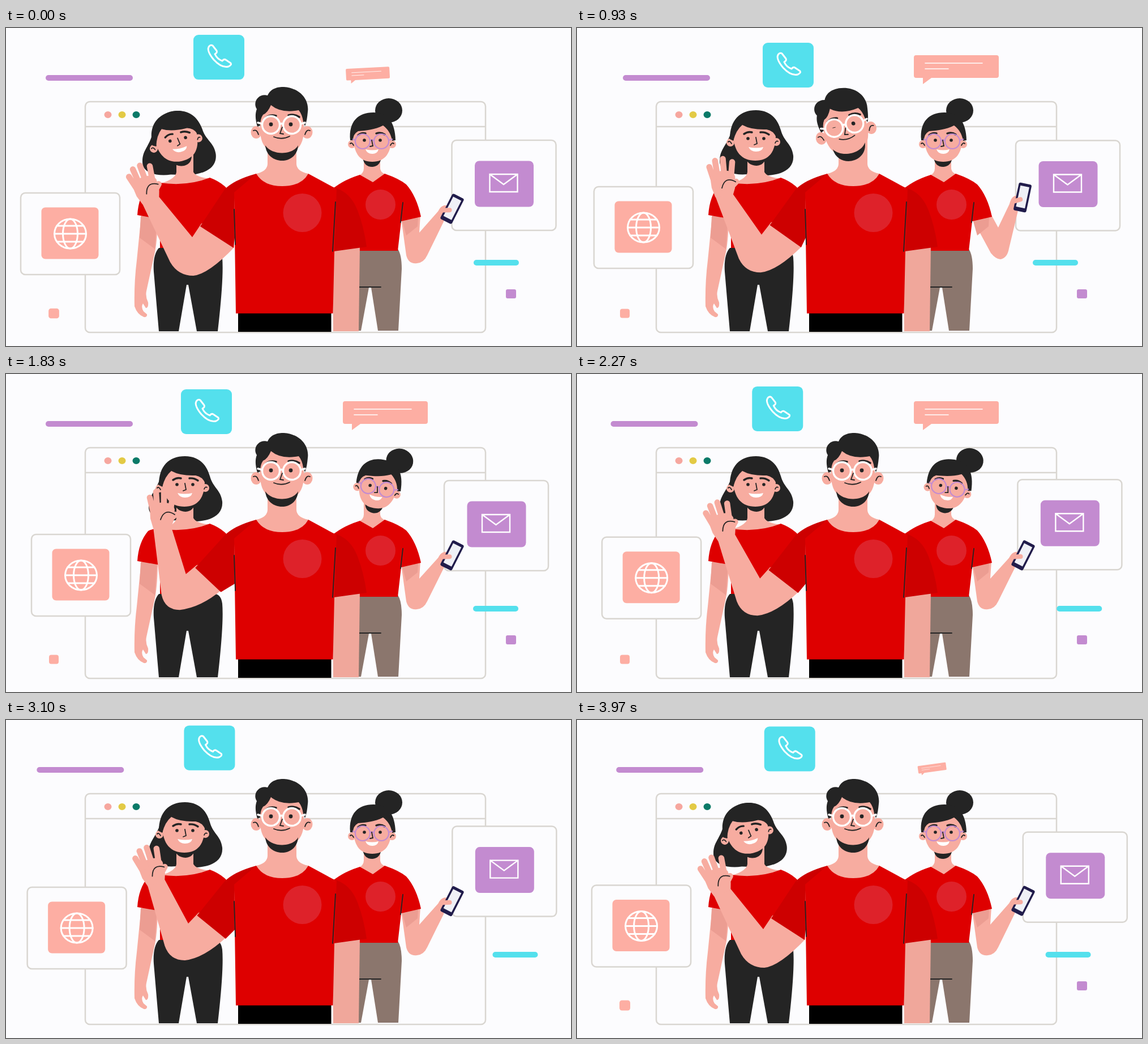
Recreate the animation shown at these times as an HTML page. Size 998x561 px, loop 4010 ms.

```html
<!DOCTYPE html>
<html lang="en">
<head>
<meta charset="utf-8">
<title>Waving team</title>
<style>
  html, body { margin: 0; height: 100%; overflow: hidden; background: #fcfcfe; }
  svg { display: block; width: 100vw; height: 100vh; }
  .skin { fill: #f7aca0; }
  .shade { fill: #ec9d92; }
  .dark { fill: #242424; }
  .red { fill: #de0000; }
  .sleeve { fill: #cd0000; }
  .badge { fill: #de222a; }
  .pink { fill: #fdaea3; }
  .purple { fill: #c38bd0; }
  .cyan { fill: #54e0ed; }
  .frame { fill: #fcfcfe; stroke: #d9d6d1; stroke-width: 2.5; }
  .icon { fill: none; stroke: #fff; stroke-width: 3; stroke-linejoin: round; stroke-linecap: round; }
  .ink { fill: none; stroke: #242424; stroke-width: 1.8; stroke-linecap: round; }
  .brow { fill: none; stroke: #242424; stroke-width: 3.4; stroke-linecap: round; }
  .finger { fill: none; stroke: #f7aca0; stroke-width: 10.5; stroke-linecap: round; }
</style>
</head>
<body>
<svg viewBox="0 0 998 561" preserveAspectRatio="none">
  <!-- browser window -->
  <rect class="frame" x="140" y="130" width="707" height="407" rx="8"/>
  <path class="frame" d="M140 174H847"/>
  <ellipse cx="180" cy="153" rx="6.5" ry="6" fill="#f6a79f"/>
  <ellipse cx="205" cy="153" rx="6.5" ry="6" fill="#e3ca45"/>
  <ellipse cx="230" cy="153" rx="6.5" ry="6" fill="#0b7a68"/>

  <!-- floating pieces -->
  <rect id="barL" class="purple" y="83" width="154" height="10" rx="5"/>
  <rect id="barR" class="cyan" y="409" width="80" height="10" rx="5"/>
  <rect id="dotL" class="pink" x="-8.5" y="-8" width="17" height="16" rx="4"/>
  <rect id="dotR" class="purple" x="-9" y="-8" width="18" height="16" rx="3"/>
  <g id="bubble">
    <path class="pink" d="M-9-49H133Q137-49 137-45V-13Q137-9 133-9H18L3 2V-9H-9Q-13-9-13-13V-45Q-13-49-9-49Z"/>
    <path class="icon" style="stroke-width:1.6" d="M7-35H108M7-25H48"/>
  </g>
  <g id="call">
    <rect class="cyan" width="90" height="79" rx="9"/>
    <path class="icon" d="M34 19L41 28Q43 31 38 34Q42 43 51 46Q54 42 57 44L66 50Q68 53 62 56Q50 59 36 44Q22 27 28 20Q31 17 34 19Z"/>
  </g>
  <g id="globe">
    <rect class="frame" width="175" height="144" rx="8"/>
    <rect class="pink" x="36.5" y="25.5" width="101" height="91" rx="7"/>
    <g class="icon">
      <ellipse cx="87.5" cy="72" rx="28" ry="26"/>
      <ellipse cx="87.5" cy="72" rx="13" ry="26"/>
      <path d="M59.5 72H115.5M64 58H111M64 86H111"/>
    </g>
  </g>
  <g id="mail">
    <rect class="frame" width="184" height="159" rx="8"/>
    <rect class="purple" x="40.5" y="36.5" width="104" height="81" rx="8"/>
    <path class="icon" style="stroke-width:2.4;stroke-linejoin:miter" d="M67 60H116V91H67ZL91.5 78 116 60"/>
  </g>

  <!-- woman on the left -->
  <g>
    <path class="skin" d="M239 330L268 336Q267 380 262 400L248 464Q246 474 251 484Q252 494 247 494L242 486Q238 492 243 500L249 505Q250 510 244 510Q232 506 227 491Q226 450 231 410Z"/>
    <path class="shade" d="M238 332H267L263 390 236 370Z"/>
    <path class="dark" d="M270 388H370Q380 390 382 405Q385 440 374 535H337L322 453H319L305 535H270L261 430Q259 400 270 388Z"/>
    <path id="hairL" class="dark" d="M316 146C285 146 277 170 270 190C262 210 252 215 252 235C252 255 280 260 301 258L331 260C360 260 384 250 382 225C380 205 365 200 360 180C352 155 335 146 316 146Z"/>
    <path class="skin" d="M301 222H331V254Q335 263 362 266L350 284H290L274 274Q300 266 301 254Z"/>
    <path class="red" d="M272 273Q320 280 360 264Q390 275 402 300L372 388H272V337L232 330Q234 297 251 277Q260 272 272 273Z"/>
    <g id="headL">
      <circle class="skin" cx="271" cy="202" r="7"/>
      <circle class="skin" cx="352" cy="201" r="7"/>
      <path class="dark" d="M297 226Q300 242 317 243Q332 242 334 226Z"/>
      <path class="skin" d="M276 185C276 160 351 160 351 185C352 220 338 234 315 234C292 234 276 220 276 185Z"/>
      <path class="dark" d="M270 196C270 162 288 145 316 145C345 145 360 166 361 192L352 193Q347 181 335 179Q308 180 292 171Q281 180 276 199Z"/>
      <path class="brow" d="M295 187Q302 182 309 184M324 184Q332 183 339 188"/>
      <circle class="dark" cx="302" cy="195" r="2.8"/>
      <circle class="dark" cx="330" cy="195" r="2.8"/>
      <path class="ink" d="M316 193L318 204 313 206M267 201Q270 198 273 204M355 200Q352 198 350 203"/>
      <path fill="#fff" d="M303 210Q316 213 329 210Q327 218 316 218Q307 218 303 210Z"/>
    </g>
  </g>

  <!-- woman on the right -->
  <g>
    <path fill="#8b766d" d="M610 390H692Q699 400 699 425L693 534H657L645 458H641L627 534H610Z"/>
    <path class="ink" d="M620 457H662"/>
    <path id="armR" class="skin"/>
    <path class="shade" d="M699 338L728 334 727 350Q712 362 707 366Z"/>
    <path class="skin" d="M632 224H661V248Q662 255 670 258L648 276 624 260Q632 256 632 248Z"/>
    <path class="red" d="M625 259L648 272 669 257Q695 266 707 276Q725 296 733 333L698 341 692 393H570V290Q590 270 625 259Z"/>
    <path class="ink" d="M701 308L697 343"/>
    <circle class="badge" cx="661.5" cy="311.5" r="26.5"/>
    <g id="headR">
      <ellipse class="dark" cx="676" cy="145.5" rx="24" ry="21.5"/>
      <circle class="skin" cx="611" cy="205" r="7"/>
      <circle class="skin" cx="682" cy="205" r="7"/>
      <path class="dark" d="M630 228Q632 245 647 245Q661 244 663 228Z"/>
      <path class="skin" d="M613 185C613 160 681 160 681 185C682 222 669 236 647 236C625 236 613 222 613 185Z"/>
      <path class="dark" d="M608 198C605 165 622 149 649 149C674 149 687 165 688 198L682 199C680 186 674 178 666 172C652 179 636 181 622 182Q613 187 613 198Z"/>
      <path class="brow" d="M622 189Q628 184 635 186M654 186Q662 183 669 188"/>
      <circle class="dark" cx="633" cy="198" r="2.8"/>
      <circle class="dark" cx="661" cy="198" r="2.8"/>
      <g fill="none" stroke="#c38bd0" stroke-width="2.2">
        <circle cx="630" cy="200" r="13"/>
        <circle cx="663" cy="200" r="13"/>
        <path d="M643 199Q646.5 196 650 199M612 196L617 198M676 198L683 196"/>
      </g>
      <path class="ink" d="M646 198L648 208 643 209M608 204Q611 201 614 207M685 204Q682 201 679 207"/>
      <path fill="#fff" d="M635 214Q647 217 658 214Q656 222 647 222Q638 222 635 214Z"/>
    </g>
    <g id="phone">
      <ellipse class="skin" cx="-10" cy="13" rx="10" ry="14"/>
      <rect x="-11.5" y="-25" width="23" height="50" rx="3" fill="#211c4b"/>
      <rect x="-8" y="-20" width="16" height="38" fill="#eff0f6"/>
      <path class="finger" style="stroke-width:8" d="M-14 10L-3 4"/>
    </g>
  </g>

  <!-- man -->
  <g>
    <path fill="#f0a79b" d="M577 385H625L623 535H578Z"/>
    <path class="sleeve" d="M578 281Q608 288 621 322Q632 350 637 386L579 394Z"/>
    <path id="armL" class="skin"/>
    <rect x="410" y="500" width="164.5" height="36" fill="#000"/>
    <path class="red" d="M442 257L403 280V300L406 503.500H577.500L580 394 584 284 534 257Z"/>
    <path id="sleeveL" class="sleeve"/>
    <path class="ink" d="M403 320L405 382M582 307L577 394"/>
    <path class="skin" d="M462 195V240Q461 253 442 257Q455 279 488 279Q522 279 534 257Q514 253 513 240V195Z"/>
    <circle class="badge" cx="523.5" cy="326" r="34"/>
    <g id="headM">
      <ellipse class="skin" cx="442" cy="184" rx="9.5" ry="11"/>
      <ellipse class="skin" cx="532" cy="184" rx="9.5" ry="11"/>
      <path class="skin" d="M449 132H526V180C526 210 510 223 488 223C466 223 449 210 449 180Z"/>
      <path class="dark" d="M458 207C461 243 514 243 516 207C506 225 470 225 458 207Z"/>
      <path class="dark" d="M444 174C440 160 440 151 443 143C435 131 446 115 462 119C468 106 480 104 491 104C520 106 536 127 533 148C532 158 531 166 528 173L525 165Q523 152 517 145Q486 151 468 136Q462 150 454 153Q449 160 449 172Z"/>
      <path class="brow" d="M459 158Q467 152 477 155M499 154Q509 151 518 157"/>
      <ellipse id="wink" class="dark" cx="468" cy="170" rx="3.4"/>
      <circle class="dark" cx="503" cy="170" r="3.4"/>
      <g class="icon" style="stroke-width:3.4">
        <circle cx="468" cy="171" r="15.5"/>
        <circle cx="505" cy="171" r="15.5"/>
        <path d="M484 170Q486.5 167 489 170M445 167L452 169M521 169L528 167"/>
      </g>
      <path class="ink" d="M488 175L484 186 490 187M473 192Q487 198 501 191M437 181Q443 178 446 188M537 181Q531 178 528 188"/>
    </g>
    <g id="hand">
      <path class="skin" d="M-23-8Q-14-20 2-18Q18-18 21-6L19 14 14 27H-17L-22 10Z"/>
      <path class="finger" d="M-18-6L-23-27M-10-8L-12-37M2-8V-39M14-8L18-32"/>
      <path class="finger" d="M11 13L22 3"/>
      <path class="ink" d="M-4 12Q3-9 21 3"/>
    </g>
  </g>
</svg>
<script>
const LOOP = 4010;
const $ = id => document.getElementById(id);
const put = (id, name, value) => $(id).setAttribute(name, value);

// Looping monotone cubic curve through the given times and values.
function curve(times, values) {
  const n = times.length;
  const x = i => times[(i + n) % n] + LOOP * Math.floor(i / n);
  const y = i => values[(i + n) % n];
  const slope = i => (y(i + 1) - y(i)) / (x(i + 1) - x(i));
  const tangent = i => {
    const a = slope(i - 1), b = slope(i);
    return a * b > 0 ? 2 * a * b / (a + b) : 0;
  };
  return t => {
    let i = n - 1;
    while (i > 0 && times[i] > t) i--;
    const h = x(i + 1) - x(i), u = (t - x(i)) / h, w = 1 - u;
    return y(i) * w * w * (1 + 2 * u) + y(i + 1) * u * u * (3 - 2 * u)
      + h * u * w * (tangent(i) * w - tangent(i + 1) * u);
  };
}
const curvesAt = times => (...values) => curve(times, values);

const drift = curvesAt([0, 370, 930, 1830, 2730, 3470]);
const barL = drift(70, 76, 81, 70, 52, 59);
const barR = drift(826, 814, 805, 825, 864, 850);
const cards = {
  call: [drift(331, 332, 328, 309, 310, 321.5), drift(12, 18.5, 26, 27, 14, 7.5)],
  globe: [drift(26, 26, 30, 45, 42, 32), drift(291, 286, 280, 283, 293, 296)],
  mail: [drift(787.5, 782, 775, 774, 785, 790), drift(198, 200, 198.5, 188, 185.5, 191.5)]
};

const popL = curve([0, 200, 2300, 2500, 3750, 3900], [1.1, 1, 1, 0, 0, 1.14]);
const popR = curve([0, 2300, 2500, 3150, 3350, 3470], [1, 1, 0, 0, 1.1, 1]);
const bubbleSize = curve([0, 130, 250, 2400, 2600, 3870, 3970], [.51, 1, 1, 1, 0, 0, .33]);
const bubbleTilt = curve([0, 180, 370, 650, 2600, 3870, 3970], [-3, 4, 2.3, 0, 0, -14, -8]);

const tiltL = curve([0, 370, 930, 3470, 3930], [-12.5, -7.5, 0, 0, -12.5]);
const tiltM = curve([0, 930, 1200, 1750], [0, -12, -12, 0]);
const tiltR = curve([0, 1100, 1600, 2150, 2850], [0, 0, 11, 11, 0]);
const eye = curve([0, 600, 750, 1100, 1250], [3.4, 3.4, .5, .5, 3.4]);

const wave = curvesAt([0, 370, 600, 930, 1250, 1830, 2730, 3470, 3970]);
const bend = wave(0, .8, 1, .22, 0, .8, 0, 1, 0);
const handX = wave(248, 269, 276, 259, 246, 277, 237, 280, 249);
const handY = wave(280, 245, 242, 270, 282, 245, 285, 241, 280);
const handTilt = wave(-20, -2, 0, -5, -20, 0, -36, 0, -20);

const lift = curvesAt([0, 370, 930, 1500]);
const phoneX = lift(788, 773, 787, 788);
const phoneY = lift(319, 296, 299, 320);
const phoneTilt = lift(27, 6, 12, 27);
const raise = lift(0, 1, 1, 0);

const mixer = k => (x0, y0, x1, y1) => `${x0 + (x1 - x0) * k} ${y0 + (y1 - y0) * k} `;

// Point (px, py) of a part that stands at (x, y), turned by deg.
function turned(x, y, deg, px, py) {
  const a = deg * Math.PI / 180, c = Math.cos(a), s = Math.sin(a);
  return `${x + px * c - py * s} ${y + px * s + py * c} `;
}

const place = (id, x, y, deg = 0, size = 1) =>
  put(id, 'transform', `translate(${x} ${y}) rotate(${deg}) scale(${size})`);

function drawWave(t) {
  const mix = mixer(bend(t)), at = [handX(t), handY(t), handTilt(t)];
  place('hand', ...at);
  put('armL', 'd', 'M400 330L' + mix(345, 345, 335, 335)
    + 'L' + mix(329, 369, 315, 349)
    + 'L' + turned(...at, 15, 25) + 'L' + turned(...at, -17, 25)
    + 'L' + mix(290, 413, 271, 384)
    + 'Q' + mix(304, 437, 275, 411) + mix(331, 437, 301, 411)
    + 'Q' + mix(358, 434, 340, 407) + mix(403, 387, 376, 379) + 'Z');
  put('sleeveL', 'd', 'M442 257Q402 268 386 285L' + mix(343, 350, 332, 340)
    + 'L' + mix(402, 388, 374, 384) + 'L404 370 403 290Z');
}

function drawPhone(t) {
  const mix = mixer(raise(t)), at = [phoneX(t), phoneY(t), phoneTilt(t)];
  place('phone', ...at);
  put('armR', 'd', 'M698 336L' + mix(707, 401, 731, 397)
    + 'Q' + mix(711, 417, 740, 408) + mix(726, 415, 748, 408)
    + 'Q' + mix(738, 414, 760, 406) + mix(744, 401, 763, 389)
    + 'L' + turned(...at, -3, 26) + 'L' + turned(...at, -19, 11)
    + 'L' + mix(730, 361, 744, 352) + 'L732 330Z');
}

function draw(t) {
  put('barL', 'x', barL(t));
  put('barR', 'x', barR(t));
  for (const id in cards) place(id, ...cards[id].map(c => c(t)));
  place('dotL', 84.5, 503.5, 0, popL(t));
  place('dotR', 892, 469, 0, popR(t));
  place('bubble', 608, 97, bubbleTilt(t), bubbleSize(t));

  const lean = tiltL(t);
  put('headL', 'transform', `rotate(${lean} 316 253)`);
  put('hairL', 'transform', `translate(${lean}) rotate(${lean / 5} 316 200)`);
  put('headM', 'transform', `rotate(${tiltM(t)} 488 240)`);
  put('headR', 'transform', `rotate(${tiltR(t)} 646 250)`);
  put('wink', 'ry', eye(t));
  drawWave(t);
  drawPhone(t);
}

function tick() {
  draw(performance.now() % LOOP);
  requestAnimationFrame(tick);
}
tick();
</script>
</body>
</html>
```
